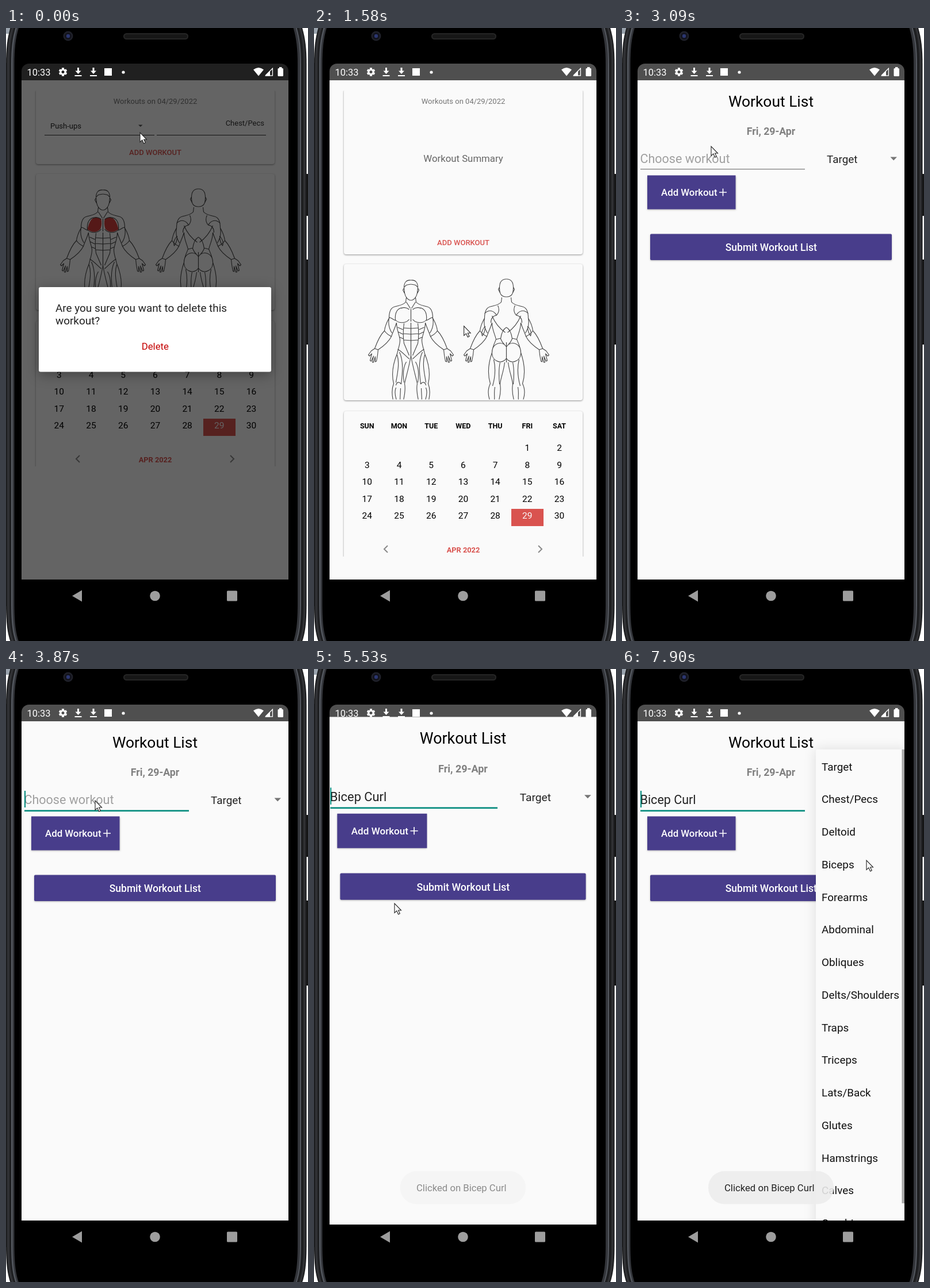
These frames come from a looping animation (525 by 1067 pixels, 8 s). An HTML page with a canvas:

```html
<!DOCTYPE html>
<html lang="en">
<head>
<meta charset="utf-8">
<title>Workout planner</title>
<style>
html, body { margin: 0; width: 100%; height: 100%; overflow: hidden; background: #fff; }
canvas { display: block; width: 525px; height: 1067px; }
</style>
</head>
<body>
<canvas id="stage" width="525" height="1067"></canvas>
<script>
const ctx = document.getElementById('stage').getContext('2d');
const LOOP = 8000;
const LEFT = 27, WIDTH = 464;
const PAPER = '#fafafa', RED = '#d9534f', PURPLE = '#483d8b', TEAL = '#00897b', STATUS = 79;

// Bursts of screen updates: start, end, number of steps
const BURSTS = [[250, 1180, 8], [1430, 2400, 7], [2550, 3480, 8], [3600, 3870, 3],
  [4150, 5110, 8], [5260, 6160, 8], [6310, 7210, 8], [7360, 7900, 5]];

const POINTER = [[120, 233, 182], [770, 263, 559], [1300, 263, 559], [1910, 252, 371],
  [2500, 252, 371], [2900, 155, 232], [2960, 155, 232], [3070, 155, 206], [3480, 155, 229],
  [4410, 155, 229], [5110, 140, 408], [5500, 140, 408], [6160, 262, 300], [6700, 400, 228],
  [6960, 400, 228], [7210, 384, 230], [7360, 395, 262], [7620, 424, 368], [7900, 425, 333]];
const DIM = [[900, 0.6], [1030, 0.21], [1180, 0]];
const DIALOG = [[900, 1], [1030, 0.1], [1180, 0]];
const TOAST = [[5380, 0], [5500, 0.5], [5620, 1]];
const POPUP = [[6700, 0], [6830, 0.6], [6960, 1]];

const OPEN_EDITOR = 2168, ADD_ROW = 2960, FOCUS = 3600, OPEN_LIST = 4120, CLOSE_LIST = 5380;

const EXERCISES = ['Push-ups', 'Squats', 'Pull-ups', 'Bicep Curl', 'Chest Dip', 'Dips',
  'Tricep Extension', 'Standing Barbell Curl', 'Leg Press', 'Calf-raise', 'Calf raise',
  'Tricep Kickback', 'Bent over row'];
const TARGETS = ['Target', 'Chest/Pecs', 'Deltoid', 'Biceps', 'Forearms', 'Abdominal',
  'Obliques', 'Delts/Shoulders', 'Traps', 'Triceps', 'Lats/Back', 'Glutes', 'Hamstrings',
  'Calves', 'Quadriceps'];

// Right halves of the figures, mirrored when drawn
const ARM = 'M8 30 L9 38 C14 44 22 44 28 46 C36 48 38 57 38 66 C42 73 45 80 46 88' +
  'C54 96 59 108 63 119 L69 123 L74 130 L72 132 L68 128 L71 140 L69 141 L65 132 L67 143 L65 143' +
  'L62 133 L62 142 L60 141 L58 130 L57 121 C48 115 39 108 34 98 C31 89 28 84 25 74' +
  'M38 66 C40 76 38 84 33 92 M46 88 C42 94 38 96 34 98 M57 121 L63 119';
const FRONT = new Path2D(ARM +
  'M0 0 C8 -1 12 4 12 13 L11 22 C10 29 5 35 0 35 M0 7 C5 8 9 7 11 12 M12 14 L14 17 L11 23' +
  'M8 38 L1 49 M16 48 C25 50 28 59 27 70 C33 68 36 63 38 66' +
  'M3 51 C8 47 13 47 17 49 M27 69 C21 76 8 75 3 68 M0 50 L0 72' +
  'M25 74 C25 86 20 95 19 104 C19 112 22 119 24 128 C31 145 34 164 30 180 C34 190 33 200 31 209' +
  'M0 74 L0 131 M12 75 C14 90 13 104 12 110 L3 131 M0 84 L13 83 M0 94 L13 93 M0 105 L13 104' +
  'M23 82 L14 86 M22 90 L14 94 M20 99 L13 102 M23 120 C16 124 10 131 3 137' +
  'M0 131 C3 150 8 166 11 180 C9 190 11 200 13 209 M20 125 C12 142 15 164 17 181' +
  'M24 130 C19 145 24 164 26 178 M8 142 C14 152 14 165 12 178' +
  'M17 181 C20 176 25 177 26 183 M18 188 L19 209 M26 187 C29 194 27 203 25 209');
const CHEST = new Path2D('M3 51 C8 47 13 47 17 49 C22 52 25 60 27 68 C21 75 8 74 4 67 C2 61 2 56 3 51 Z');
const BACK = new Path2D(ARM +
  'M0 -2 C9 -2 12 4 12 13 C12 24 9 29 0 29 M12 12 L14 16 L11 22' +
  'M15 44 C12 50 13 56 17 61 M17 61 C22 53 30 50 38 58' +
  'M17 61 C24 62 27 66 27 74 M25 62 C20 74 12 84 2 91' +
  'M25 74 C25 86 20 94 18 103 C21 110 25 118 25 126 C32 146 33 164 28 180 C33 190 32 200 29 209' +
  'M0 82 C7 86 9 94 10 102 C7 110 3 112 0 116 M18 103 L10 101' +
  'M0 108 L0 143 M3 112 C15 105 26 114 25 128 C24 142 7 147 0 136' +
  'M3 143 C5 160 10 170 11 181 C9 192 11 201 13 209 M22 138 C18 155 20 170 24 184' +
  'M11 143 C14 156 13 170 12 181 M20 186 C22 196 20 203 21 209' +
  'M37 80 C42 86 44 92 42 97 C38 92 37 86 37 80');
const ARROW = new Path2D('M0 0 V16.4 L3.8 12.9 L6.6 19 L9.3 17.8 L6.6 12 H11.5 Z');

const clamp = v => Math.max(0, Math.min(1, v));

function snap(t) {
  let q = 0;
  for (const [a, b, n] of BURSTS) {
    const d = Math.floor((b - a) / (n - 1) / 10) * 10;
    if (t >= b) q = b;
    else if (t >= a) q = a + d * Math.min(n - 2, Math.floor((t - a) / d));
  }
  return q;
}

function track(t, knots) {
  const i = knots.findIndex(k => k[0] > t);
  if (i === 0) return knots[0].slice(1);
  if (i < 0) return knots[knots.length - 1].slice(1);
  const a = knots[i - 1], b = knots[i], p = (t - a[0]) / (b[0] - a[0]);
  return a.slice(1).map((v, j) => v + (b[j + 1] - v) * p);
}

// Fast start with a long settling tail
function settle(age) {
  return age <= 0 ? 0 : age > 380 ? 1 : 1 - Math.exp(-0.0148 * age);
}

function layer(alpha, draw) {
  ctx.save();
  ctx.globalAlpha *= alpha;
  draw();
  ctx.restore();
}

function clip(x, y, w, h, r = 0) {
  ctx.beginPath();
  ctx.roundRect(x, y, w, h, r);
  ctx.clip();
}

function rect(x, y, w, h, color) {
  ctx.fillStyle = color;
  ctx.fillRect(x, y, w, h);
}

function round(x, y, w, h, r, color) {
  ctx.fillStyle = color;
  ctx.beginPath();
  ctx.roundRect(x, y, w, h, r);
  ctx.fill();
}

function raised(x, y, w, h, r, color, blur, drop, shade) {
  ctx.save();
  ctx.shadowColor = `rgba(0,0,0,${shade})`;
  ctx.shadowBlur = blur;
  ctx.shadowOffsetY = drop;
  round(x, y, w, h, r, color);
  ctx.restore();
}

function disc(x, y, r, color) {
  ctx.fillStyle = color;
  ctx.beginPath();
  ctx.arc(x, y, r, 0, 7);
  ctx.fill();
}

function poly(color, ...p) {
  ctx.fillStyle = color;
  ctx.beginPath();
  for (let i = 0; i < p.length; i += 2) ctx.lineTo(p[i], p[i + 1]);
  ctx.fill();
}

function line(color, width, ...p) {
  ctx.strokeStyle = color;
  ctx.lineWidth = width;
  ctx.beginPath();
  for (let i = 0; i < p.length; i += 2) ctx.lineTo(p[i], p[i + 1]);
  ctx.stroke();
}

// y is the middle of the capitals
function text(s, x, y, size, color, align = 'left', weight = 400) {
  ctx.font = `${weight} ${size}px Roboto, sans-serif`;
  ctx.textAlign = align;
  ctx.fillStyle = color;
  ctx.fillText(s, x, y + size * 0.355);
}

function statusIcons() {
  const w = '#fff';
  text('10:33', 36.5, 77, 16.5, w);
  for (let i = 0; i < 6; i++) {
    const a = i * Math.PI / 3 + Math.PI / 6, c = Math.cos(a), s = Math.sin(a);
    line(w, 4, 99 + 3 * c, 76.5 + 3 * s, 99 + 7.2 * c, 76.5 + 7.2 * s);
  }
  ctx.lineWidth = 3;
  ctx.beginPath();
  ctx.arc(99, 76.5, 4, 0, 7);
  ctx.stroke();
  for (const x of [125.5, 152]) {
    rect(x - 1.5, 69, 3, 6, w);
    poly(w, x - 5, 74.5, x + 5, 74.5, x, 80);
    rect(x - 6, 82, 12, 2, w);
  }
  rect(171, 70, 13, 13, w);
  disc(204, 77, 2.6, w);
  ctx.fillStyle = w;
  ctx.beginPath();
  ctx.moveTo(439, 83.5);
  ctx.lineTo(430, 72.5);
  ctx.quadraticCurveTo(439, 65.5, 448, 72.5);
  ctx.fill();
  line(w, 1.3, 451, 82.8, 463.4, 82.8, 463.4, 70.4, 451, 82.8);
  poly(w, 450, 83.5, 459, 83.5, 459, 74.5);
  round(472.5, 70, 9.5, 14, 1.5, w);
  rect(475, 68, 4.5, 3, w);
}

function figure(x, y, shape, fill) {
  for (const side of [1, -1]) {
    ctx.save();
    ctx.translate(x, y);
    ctx.scale(side, 1);
    if (fill) {
      ctx.fillStyle = '#d63f3b';
      ctx.fill(fill);
    }
    ctx.strokeStyle = '#444';
    ctx.lineWidth = 1.1;
    ctx.lineJoin = 'round';
    ctx.stroke(shape);
    ctx.restore();
  }
}

function summaryPage(hasWorkout) {
  const card = (y, h) => raised(52, y, 415, h, 4, PAPER, 3, 1, 0.42);
  const dy = hasWorkout ? -157 : 0;
  // The scrolling area cuts off the edges of the outer cards
  ctx.save();
  clip(LEFT, 109, WIDTH, 811 + dy);
  card(107, 287 + dy);
  card(411 + dy, 237);
  card(667 + dy, 260);
  ctx.restore();

  text('Workouts on 04/29/2022', 259.5, 127, 13, '#757575', 'center');
  if (hasWorkout) {
    text('Push-ups', 77, 170, 13, '#222');
    poly('#555', 230, 168.5, 237.5, 168.5, 233.8, 172);
    line('#333', 1, 67, 186.5, 258, 186.5);
    line('#333', 1, 262, 186.5, 452, 186.5);
    text('Chest/Pecs', 449, 165, 13, '#333', 'right');
  } else {
    text('Workout Summary', 259.5, 227, 16.8, '#666', 'center');
  }
  text('ADD WORKOUT', 259.5, 373 + dy, 13, RED, 'center', 500);

  ctx.save();
  clip(52, 412 + dy, 415, 234.5);
  figure(168.5, 439 + dy, FRONT, hasWorkout && CHEST);
  figure(334.5, 439 + dy, BACK);
  ctx.restore();

  const colX = c => 92.3 + 55.7 * c;
  ['SUN', 'MON', 'TUE', 'WED', 'THU', 'FRI', 'SAT'].forEach((d, c) =>
    text(d, colX(c), 693 + dy, 12.5, '#000', 'center', 700));
  rect(343, 837 + dy, 56, 30, RED);
  for (let day = 1; day <= 30; day++) {
    const i = day + 4;
    text(day, colX(i % 7), 730.5 + dy + 29.6 * Math.floor(i / 7), 15.5,
      day === 29 ? PAPER : '#000', 'center');
  }
  line('#8a8a8a', 2, 128, 901 + dy, 122, 907 + dy, 128, 913 + dy);
  line('#8a8a8a', 2, 390, 901 + dy, 396, 907 + dy, 390, 913 + dy);
  text('APR 2022', 259.5, 908.5 + dy, 12.8, RED, 'center', 700);
}

function editorPage(t) {
  const hasRow = t >= ADD_ROW, dy = hasRow ? 0 : -58.5;
  text('Workout List', 259, 127.5, 26.4, '#000', 'center');
  text('Fri, 29-Apr', 259, 180, 17.7, '#808080', 'center', 700);
  if (hasRow) {
    const chosen = t >= CLOSE_LIST;
    text(chosen ? 'Bicep Curl' : 'Choose workout', 31.5, 227.5, 21.5, chosen ? '#222' : '#a0a0a0');
    if (t >= FOCUS) {
      rect(32, 245.5, 286, 2.6, TEAL);
      rect(32, 212, 2, 29, TEAL);
    } else {
      rect(32, 245, 286, 1.3, '#808080');
    }
    text('Target', 356, 228, 18.9, '#222');
    poly('#757575', 466.5, 224.5, 478, 224.5, 472.2, 230.5);
  }
  raised(44, 256.5 + dy, 153.5, 59, 0, PURPLE, 3, 1, 0.28);
  text('Add Workout', 68, 286.5 + dy, 16.8, '#fff', 'left', 500);
  line('#fff', 1.6, 169, 286 + dy, 182, 286 + dy);
  line('#fff', 1.6, 175.5, 279.5 + dy, 175.5, 292.5 + dy);
  raised(49, 358.5 + dy, 420, 45.5, 2, PURPLE, 3, 1, 0.28);
  text('Submit Workout List', 259.3, 382 + dy, 17.5, '#fff', 'center', 500);
}

function listPage() {
  ctx.strokeStyle = '#757575';
  ctx.lineWidth = 2.3;
  ctx.beginPath();
  ctx.arc(85.5, 152, 6.3, 0, 7);
  ctx.stroke();
  line('#757575', 2.8, 90, 156.5, 97.5, 164);
  text('Enter workout', 116.5, 156, 21.5, '#9e9e9e');
  EXERCISES.forEach((name, i) => {
    text(name, 64.7, 231.4 + 58 * i, 19, '#222');
    rect(46, 259.2 + 58 * i, 426, 1.2, '#d6d6d6');
  });
  rect(467, 202, 5, 310, 'rgba(120,120,120,0.58)');
}

// One full window, scaled about the middle of the display
function win(page, scale = 1, alpha = 1, dim = 0) {
  const zoom = draw => layer(alpha, () => {
    ctx.translate(259, 540);
    ctx.scale(scale, scale);
    ctx.translate(-259, -540);
    draw();
  });
  const v = Math.round(STATUS * (1 - dim));
  zoom(() => rect(LEFT, 62, WIDTH, 30, `rgb(${v},${v},${v})`));
  layer(alpha, statusIcons);
  zoom(() => {
    rect(LEFT, 91, WIDTH, 869, PAPER);
    clip(LEFT, 91, WIDTH, 869);
    page();
    if (dim) rect(LEFT, 91, WIDTH, 869, `rgba(0,0,0,${dim})`);
  });
  zoom(() => rect(LEFT, 960, WIDTH, 57, '#000'));
}

function dialog() {
  raised(57, 451, 404, 147.5, 3, '#fff', 22, 5, 0.34);
  text('Are you sure you want to delete this', 86, 487, 18.9, '#222');
  text('workout?', 86, 509, 18.9, '#222');
  text('Delete', 259.3, 554.5, 16.8, '#c40000', 'center');
}

function popup() {
  clip(LEFT, 91, WIDTH, 869);
  raised(337, 140, 160, 840, 2, PAPER, 22, 0, 0.12);
  TARGETS.forEach((name, i) => text(name, 347, 170 + 56.75 * i, 18.9, '#111'));
  rect(486.5, 140, 5, 790, '#a9a9a9');
}

function toast() {
  round(150, 874, 218, 57.5, 28, 'rgba(237,237,237,0.88)');
  text('Clicked on Bicep Curl', 178, 903.5, 16.7, '#222');
}

function screen(t) {
  ctx.save();
  clip(LEFT, 62, WIDTH, 918, [13, 13, 0, 0]);
  const summary = () => summaryPage(t < 1030), editor = () => editorPage(t);
  if (t < OPEN_EDITOR) {
    win(summary, 1, 1, track(t, DIM)[0]);
    layer(track(t, DIALOG)[0], dialog);
  } else if (t < OPEN_LIST) {
    opening(summary, editor, t - OPEN_EDITOR);
  } else if (t < CLOSE_LIST) {
    opening(editor, listPage, t - OPEN_LIST);
  } else {
    const age = t - CLOSE_LIST, p = settle(age), left = 1 - clamp((age - 35) / 50);
    win(editor, 1.1 - 0.1 * p);
    if (left) win(listPage, 1 - 0.1 * p, left);
    layer(track(t, POPUP)[0], popup);
    layer(track(t, TOAST)[0], toast);
  }
  ctx.restore();
}

function opening(from, to, age) {
  const p = settle(age), alpha = clamp((age - 50) / 50);
  if (p < 1) win(from, 1 + 0.15 * p, 1, 0.5 * p);
  if (alpha) win(to, 0.85 + 0.15 * p, alpha);
}

// Phone outline between two sides, narrowing at both ends
function shell(l, r, color) {
  const bend = 8;
  ctx.fillStyle = color;
  ctx.beginPath();
  ctx.moveTo(l + bend, -2);
  ctx.bezierCurveTo(l + 2, 18, l, 36, l, 64);
  ctx.lineTo(l, 1000);
  ctx.bezierCurveTo(l, 1034, l + 2, 1052, l + bend, 1069);
  ctx.lineTo(r - bend, 1069);
  ctx.bezierCurveTo(r - 2, 1052, r, 1034, r, 1000);
  ctx.lineTo(r, 64);
  ctx.bezierCurveTo(r, 36, r - 2, 18, r - bend, -2);
  ctx.fill();
}

function phone() {
  rect(0, 0, 525, 1067, '#fff');
  rect(0, 0, 8, 10, '#9aa3ad');
  rect(519, 254, 6, 73, '#141414');
  rect(519, 403, 6, 148, '#141414');
  shell(0, 522.5, '#1c1d1f');
  shell(2, 520.5, '#303134');
  shell(6, 517, '#1d1e20');
  shell(9, 513, '#54585f');
  shell(11.5, 511, '#33353a');
  shell(14.5, 507, '#000');
  disc(108, 14, 8.5, '#20212a');
  disc(108, 14, 6, '#12131c');
  disc(108, 14, 3.2, '#2b3670');
  round(204, 9, 113, 11, 5.5, '#262626');
  round(206, 11, 109, 7, 3.5, '#171717');
}

function navigation() {
  const c = '#9d9d9d';
  poly(c, 115, 988.5, 132, 978.5, 132, 998.5);
  disc(259, 988.5, 8.8, c);
  round(384, 979.5, 18, 18, 1.5, c);
}

function pointer(x, y) {
  ctx.save();
  ctx.translate(x, y);
  ctx.fillStyle = '#fff';
  ctx.fill(ARROW);
  ctx.strokeStyle = '#222';
  ctx.lineWidth = 1.1;
  ctx.stroke(ARROW);
  ctx.restore();
}

const start = performance.now();
function frame() {
  const t = snap((performance.now() - start) % LOOP);
  phone();
  screen(t);
  navigation();
  pointer(...track(t, POINTER));
  requestAnimationFrame(frame);
}
frame();
</script>
</body>
</html>
```
